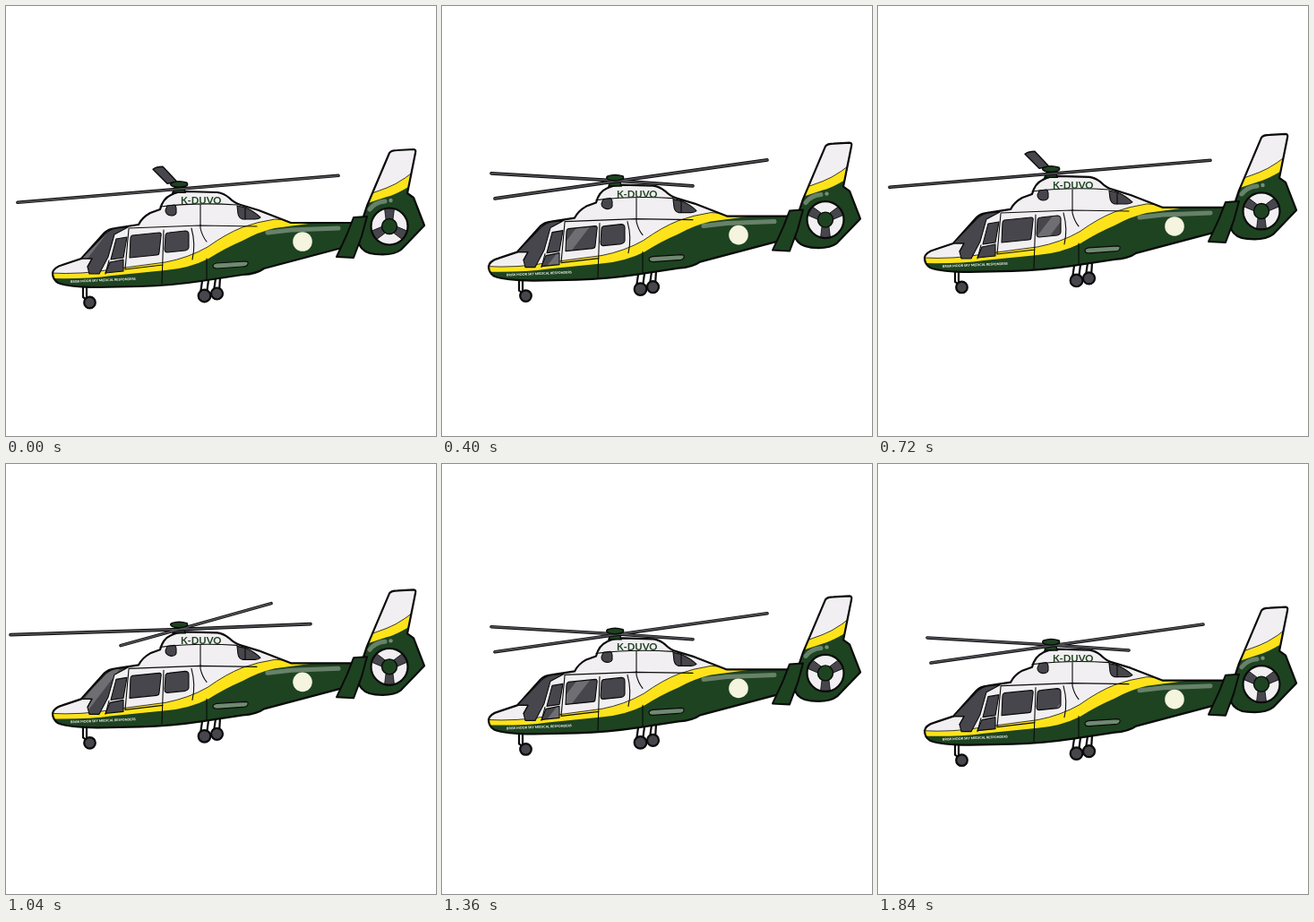
An HTML page that plays this animation: 480x480 px, repeating every 1920 ms.

```html
<!DOCTYPE html>
<html lang="en">
<head>
<meta charset="utf-8">
<title>Helicopter</title>
<style>
html, body { margin: 0; width: 100%; height: 100%; overflow: hidden; background: #fff; }
svg { display: block; width: 100vw; height: 100vh; }
.line { fill: none; stroke: #0a0a0a; stroke-linecap: round; stroke-linejoin: round; }
.thick { stroke-width: 2.2; }
.thin { stroke-width: 1.1; }
.white { fill: #f1eff1; }
.green { fill: #1e4321; }
.yellow { fill: #ffe31a; }
.trim { stroke: #0a0a0a; stroke-width: .8; }
.glass { fill: #47464c; }
.shine { fill: none; stroke: #fff; stroke-opacity: .33; stroke-linecap: round; }
text { font-family: Lato, "Open Sans", sans-serif; font-weight: 700; }
</style>
</head>
<body>
<svg viewBox="0 0 480 480">
  <defs>
    <path id="hull" d="M52 298Q53 292 63 289L84 282L110 253Q114 249 122 248L148 244Q152 236 161 231L172 227Q175 215 184 211Q191 207 201 207L236 208Q243 209 249 214Q255 220 262 222L282 228L318 242L386 242L400 236L400 264L371 271L288 293Q280 299 264 300L218 307Q185 312 150 313L102 314Q71 314 58 309Q52 305 52 298Z"/>
    <path id="fin" d="M428 164Q430 161 437 161L455 160Q458 160 457 164L448 209L455 214L467 245L441 272Q432 279 412 277Q399 276 394 266Q396 252 399 235L403 223Z"/>
    <path id="panes" d="M84 282L111 254Q116 249 124 248L136 247L121 255L114 280L104 299L93 299L91 291L96 282Z
      M123 260L135 258L131 281L117 283Z M116 286L131 283L131 296L111 298Z
      M141 256L171 253Q174 253 173 257L171 275Q171 278 168 278L138 281L139 259Q139 257 141 256Z
      M182 253L200 251Q204 251 204 255L204 269Q204 272 200 273L180 275Q177 275 177 271L178 257Q178 253 182 253Z
      M180 223L188 222Q190 223 190 226L190 231Q189 234 184 234Q178 233 178 228Z
      M258 223L267 225Q277 229 284 236Q282 238 278 238L264 238Q260 237 259 232Z"/>
    <clipPath id="inHull"><use href="#hull"/></clipPath>
    <clipPath id="inFin"><use href="#fin"/></clipPath>
    <clipPath id="inPanes"><use href="#panes"/></clipPath>
  </defs>
  <g id="craft">
    <g class="line thick">
      <path d="M86 311V325L93 330M90 312V325M219 307L217 321M226 306L224 321M234 304L232 318M239 303L238 319"/>
      <g style="fill:#47464c">
        <circle cx="93.5" cy="331" r="6.3"/><circle cx="221.5" cy="323.5" r="6.8"/><circle cx="235.5" cy="321" r="6.5"/>
      </g>
    </g>

    <g clip-path="url(#inHull)">
      <use href="#hull" class="white"/>
      <path class="yellow trim" d="M48 298Q85 300 118 294L178 286Q204 281 225 269Q246 254 264 247Q280 241 300 238L350 241L350 320H48Z"/>
      <path class="green" d="M48 304Q90 305 118 301L178 295Q204 293 226 282Q245 270 264 262Q282 252 300 248L345 242L410 232V320H48Z"/>
      <path class="shine" stroke-width="5" d="M292 253L318 250L371 248"/>
    </g>
    <use href="#hull" class="line thick"/>
    <path class="line thin" d="M137 248L216 245L280 246M172 224Q213 219 258 222M217 222L217 248Q219 257 224 263M224 282V306M137 249L133 294L175 289M207 248Q212 266 208 283M176 250L174 310M115 284L111 299"/>
    <use href="#panes" class="glass"/>
    <g clip-path="url(#inPanes)"><path id="glint" d="M18 235H32L-18 300H-32Z" fill="#fff" fill-opacity=".22"/></g>
    <use href="#panes" class="line thin"/>
    <path class="line thin" d="M84 282L96 282L91 291M267 225V238"/>
    <path d="M235 287L267 285Q271 285 270 288Q269 291 264 291L236 293Q231 293 231 290Q231 288 235 287Z" fill="#6f8a70" stroke="#0a0a0a" stroke-width="1.2"/>
    <circle cx="331" cy="263" r="10.8" fill="#f5f4df"/>
    <text x="195" y="221" font-size="11.3" fill="#1e4321">K-DUVO</text>
    <text x="72" y="309" font-size="3.7" fill="#fff" transform="rotate(-2.5 72 309)">BRISK MOOR SKY MEDICAL RESPONDERS</text>

    <g clip-path="url(#inFin)">
      <use href="#fin" class="green"/>
      <path class="yellow" d="M395 150H470V188Q441 209 425 213L395 223Z"/>
      <path class="white trim" d="M395 150H470V172Q444 196 425 203L395 214Z"/>
      <path class="shine" stroke-width="5" d="M406 227Q412 219 423 218"/>
      <circle cx="429.5" cy="217" r="2.2" fill="#fff" fill-opacity=".4"/>
    </g>
    <use href="#fin" class="line thick"/>
    <circle cx="428" cy="246" r="20.5" class="white"/>
    <g id="fan" class="glass"></g>
    <circle cx="428" cy="246" r="20.5" class="line thick"/>
    <circle cx="428" cy="246" r="8.5" class="green" stroke="#0a0a0a" stroke-width="1.4"/>
    <path d="M388 236L403 235L397 257L388 281L369 280L381 254Z" class="green" stroke="#0a0a0a" stroke-width="2" stroke-linejoin="round"/>

    <g transform="translate(0 1.3)">
      <path d="M189 199H198L200 207H186Z" class="green" stroke="#0a0a0a" stroke-width="1.5"/>
      <g class="line">
        <path class="blade" stroke-width="3.6"/>
        <path class="blade" stroke-width="1.7" style="stroke:#525157"/>
      </g>
      <path id="nearBlade" d="M164 181Q168 178 175 178L191 195L180 197Z" class="glass" stroke="#0a0a0a" stroke-width="1.4" stroke-linejoin="round"/>
      <path d="M185 196Q193 193 202 196Q204 199 200 200Q193 202 186 200Q182 198 185 196Z" class="green" stroke="#0a0a0a" stroke-width="1.5"/>
    </g>
  </g>
</svg>
<script>
const STEP = 80, STEPS = 24;
const $ = id => document.getElementById(id);
const rotorPoses = [
  "M13 218L193 203L371 188",
  "M5 209L193 203L340 197M128 221L193 203L296 174",
  "M55 193L193 201L280 207M59 221L193 202L363 178"
];
const blades = document.querySelectorAll(".blade");

$("fan").innerHTML = [0, 120, 240].map(a =>
  `<path d="M422.5 226H433.5L431 246H425Z" stroke="#0a0a0a" stroke-width=".8" transform="rotate(${a} 428 246)"/>`
).join("");

function draw(now) {
  const n = Math.floor(now / STEP) % STEPS;
  const lift = 10 * (Math.cos(n / STEPS * 2 * Math.PI) - 1);
  $("craft").setAttribute("transform", `translate(0 ${lift.toFixed(2)})`);
  $("fan").setAttribute("transform", `rotate(${n * 60} 428 246)`);
  $("glint").setAttribute("transform", `translate(${95 + n % 12 * 10.5} 0)`);
  blades.forEach(b => b.setAttribute("d", rotorPoses[n % 3]));
  $("nearBlade").style.display = n % 3 ? "none" : "";
}

const start = performance.now();
function tick() {
  draw(performance.now() - start);
  requestAnimationFrame(tick);
}
tick();
</script>
</body>
</html>
```
